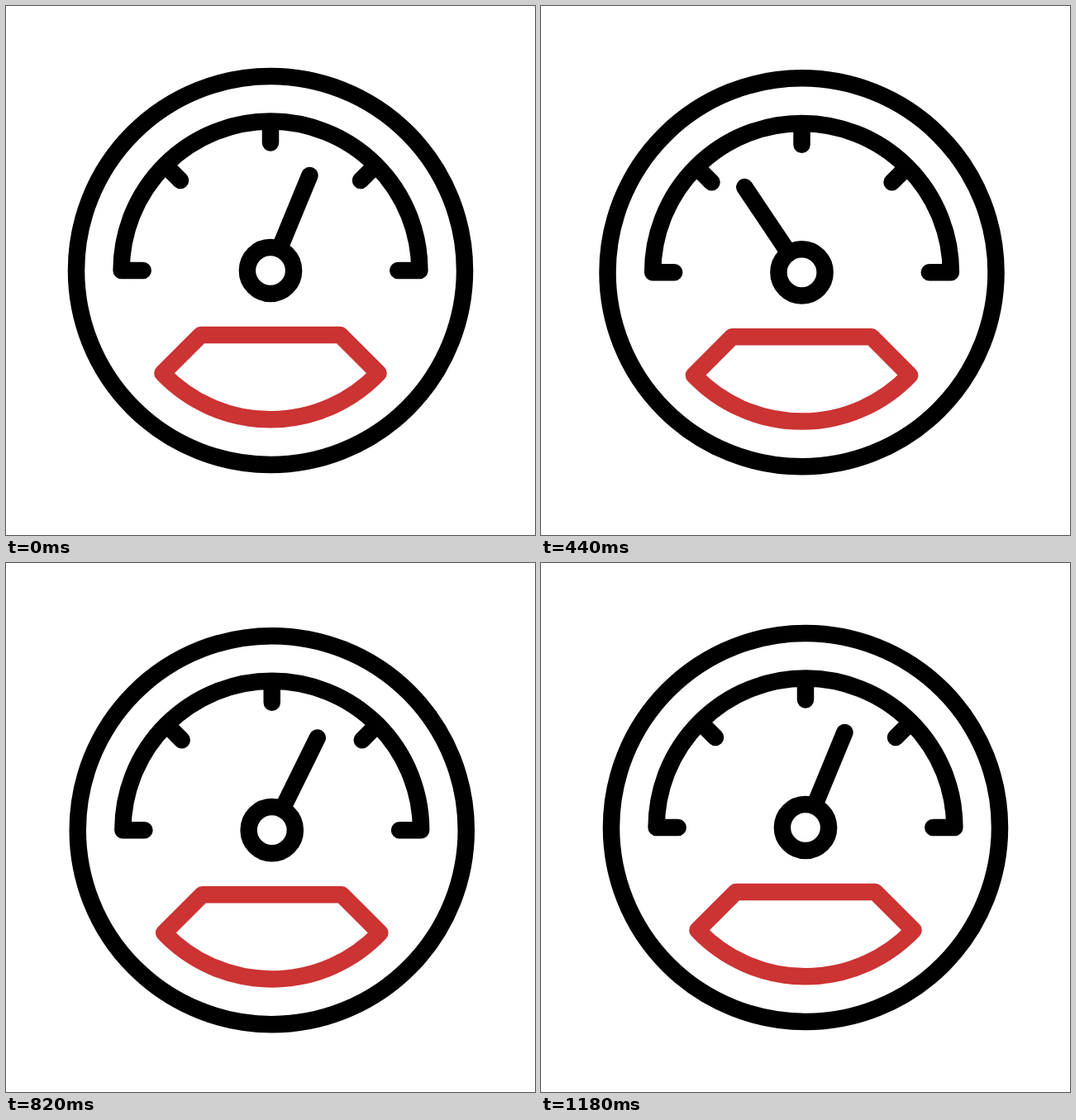
Animation of 640x640 px, one loop 1.2 s. Source, as an HTML page:

```html
<!DOCTYPE html>
<html lang="en">
<head>
<meta charset="utf-8">
<title>Gauge</title>
<style>
  html, body { margin: 0; height: 100%; overflow: hidden; background: #fff; }
  svg { display: block; width: 100%; height: 100%; }
</style>
</head>
<body>
<svg viewBox="0 0 640 640" fill="none" stroke="#000" stroke-width="20.5" stroke-linecap="round" stroke-linejoin="round">
  <g id="gauge">
    <circle r="235"/>
    <path d="M-154.3 0H-180.4A180.4 180.4 0 0 1 180.4 0H154.3M0-180V-154.5M-127.3-127.3L-109-109M127.3-127.3L109-109"/>
    <circle r="28.1"/>
    <path id="needle" d="M0-28V-124.4"/>
    <path stroke="#c33" d="M-84.3 78H84.3L130.6 124.3A180.4 180.4 0 0 1-130.6 124.3Z"/>
  </g>
</svg>
<script>
const LOOP = 1200, STEP = 20;
const gauge = document.getElementById('gauge');
const needle = document.getElementById('needle');

// Sine easing between turning points, each given as [step, value].
function sway(t, ...turns) {
  const next = turns.findIndex(([step]) => step > t);
  if (next < 0) return turns.at(-1)[1];
  const [t0, v0] = turns[next - 1], [t1, v1] = turns[next];
  return v0 + (v1 - v0) * (1 - Math.cos(Math.PI * (t - t0) / (t1 - t0))) / 2;
}

function draw(now) {
  const t = Math.floor(now % LOOP / STEP);
  const x = sway(t, [0, 0], [17, -6.6], [34.6, 4.8], [53, -6.5], [59, 0]);
  const y = sway(t, [0, 0], [9, -2.5], [23, 2.4], [31, 1.2], [45, 3.6], [56, 0]);
  const angle = sway(t, [0, 22.4], [12, -36], [25, -33.5], [37, 29.5], [46, 21.6], [59, 22.4]);
  gauge.setAttribute('transform', `translate(${320 + x} ${320 + y})`);
  needle.setAttribute('transform', `rotate(${angle})`);
}

function tick() {
  draw(performance.now());
  requestAnimationFrame(tick);
}
tick();
</script>
</body>
</html>
```
